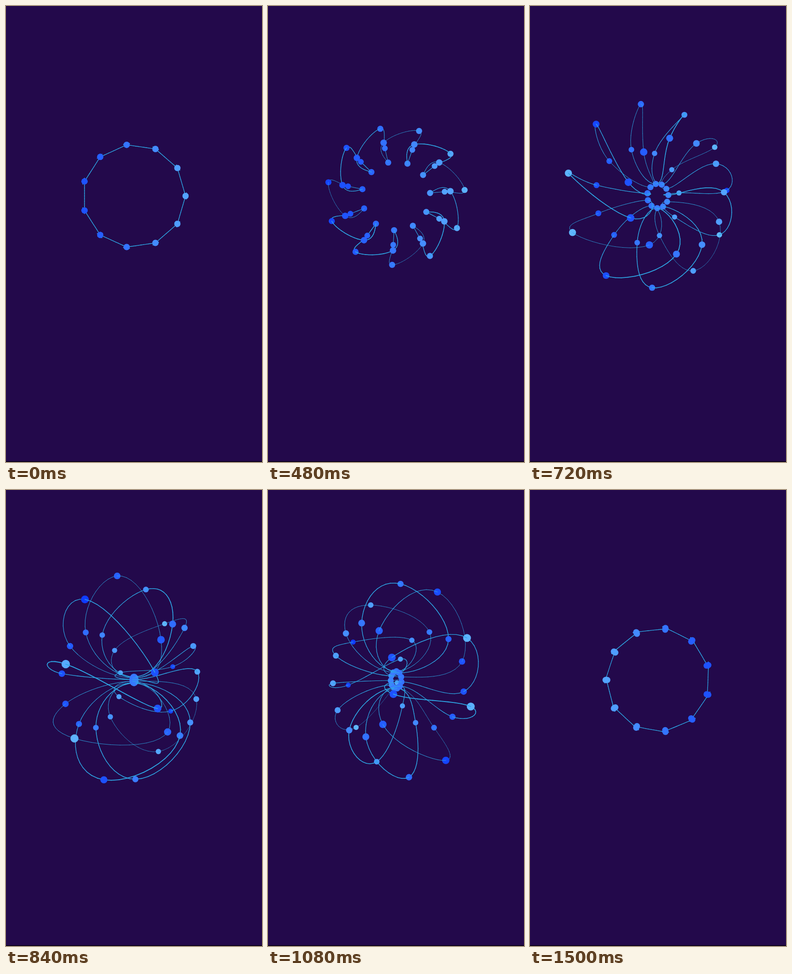
An HTML page with a canvas for the animation above (1680 ms loop, 561 by 998 pixels).

```html
<!DOCTYPE html>
<html lang="en">
<head>
<meta charset="utf-8">
<title>Torus loop</title>
<style>
  html, body { margin: 0; width: 100%; height: 100%; overflow: hidden; background: #23094b; }
  canvas { display: block; width: 561px; height: 998px; }
</style>
</head>
<body>
<canvas id="stage" width="561" height="998"></canvas>
<script>
const ctx = document.getElementById('stage').getContext('2d');
const LOOP = 1680, STEP = 30, LAST = 1500;
const CX = 280.5, CY = 415.7, RING = 113, CAMERA = 690;
const RINGS = 11, SIDES = 4, COUNT = RINGS * SIDES;
const PIECES = 12, TENSION = 0.75, DOT = 6.7;
const FLIP_START = 463, FLIP_TIME = 962;
const DARK = [14, 58, 255], LIGHT = [98, 186, 255];
const LINE = '#2ea8e6';
const WIDTHS = [1.6, 0.8, 1.2, 1.6, 0.6, 1.6, 1.6, 0.6, 1.4, 1.2, 0.7];

const lerp = (a, b, k) => a + (b - a) * k;
const clamp = v => Math.max(0, Math.min(1, v));
const wrap = (i, n) => ((i % n) + n) % n;

function hermite(a, b, ta, tb, k) {
  const k2 = k * k, k3 = k2 * k;
  return a * (2 * k3 - 3 * k2 + 1) + ta * (k3 - 2 * k2 + k) +
         b * (3 * k2 - 2 * k3) + tb * (k3 - k2);
}

// Smooth track through [time, value] keys that never overshoots
function track(keys) {
  const rate = i => (keys[i + 1][1] - keys[i][1]) / (keys[i + 1][0] - keys[i][0]);
  const slopes = keys.map((_, i) => {
    if (!i || i === keys.length - 1) return 0;
    const a = rate(i - 1), b = rate(i);
    return a * b > 0 ? 2 * a * b / (a + b) : 0;
  });
  return t => {
    let i = 0;
    while (i < keys.length - 2 && t > keys[i + 1][0]) i++;
    const [t0, v0] = keys[i], [t1, v1] = keys[i + 1], d = t1 - t0;
    return hermite(v0, v1, slopes[i] * d, slopes[i + 1] * d, clamp((t - t0) / d));
  };
}

const tubeAt = track([[0, 0], [240, 15.6], [480, 38], [540, 47.5], [720, 86.3],
                      [930, 113], [1110, 88], [1260, 31.6], [1500, 2]]);
const spinAt = track([[0, 0], [240, 10.2], [480, 37.7], [540, 45], [720, 69.4],
                      [930, 79.6], [1110, 98.2], [1260, 126.3], [1500, 130.9]]);
const flipAt = t => Math.PI * (1 - Math.cos(Math.PI * clamp((t - FLIP_START) / FLIP_TIME))) / 2;

// Tint runs along the ring's own x axis and wraps at both ends
function tint(x) {
  const v = wrap(x / 350 + 0.5, 1);
  return `rgb(${DARK.map((c, i) => Math.round(lerp(c, LIGHT[i], v))).join()})`;
}

function lineWidth(pos, tube) {
  const p = wrap(pos + 0.125, RINGS), i = Math.floor(p);
  const w = lerp(WIDTHS[i], WIDTHS[(i + 1) % RINGS], p - i);
  return lerp(1.4, w, clamp(tube / 12));
}

function draw(t) {
  const tube = tubeAt(t), spin = spinAt(t) * Math.PI / 180, flip = flipAt(t);
  const c = Math.cos(flip), s = Math.sin(flip);

  const project = ([x, y, z]) => {
    const depth = z * c - x * s, k = CAMERA / (CAMERA - depth);
    return { x: CX + (x * c + z * s) * k, y: CY + y * k, z: depth, k };
  };

  const knots = Array.from({ length: COUNT }, (_, n) => {
    const a = spin - Math.floor(n / SIDES) * 2 * Math.PI / RINGS;
    const b = (n % SIDES) * 2 * Math.PI / SIDES;
    const rho = RING + tube * Math.cos(b);
    return [rho * Math.cos(a), -rho * Math.sin(a), -tube * Math.sin(b)];
  });
  const knot = i => knots[wrap(i, COUNT)];
  const curve = (n, k) => [0, 1, 2].map(d => {
    const [p, a, b, q] = [-1, 0, 1, 2].map(o => knot(n + o)[d]);
    return hermite(a, b, TENSION * (b - p), TENSION * (q - a), k);
  });

  const items = [];
  for (let n = 0; n < COUNT; n++) {
    let from = project(knots[n]);
    items.push({ dot: true, at: from, z: from.z + 2, color: tint(knots[n][0]) });
    for (let i = 1; i <= PIECES; i++) {
      const to = project(curve(n, i / PIECES));
      const w = lineWidth((n + (i - 0.5) / PIECES) / SIDES, tube) * (from.k + to.k) / 2;
      if (Math.hypot(to.x - from.x, to.y - from.y) > 0.01)
        items.push({ from, to, w, z: (from.z + to.z) / 2 });
      from = to;
    }
  }
  items.sort((a, b) => a.z - b.z);

  ctx.fillStyle = '#23094b';
  ctx.fillRect(0, 0, 561, 998);
  ctx.fillStyle = '#06010f';
  ctx.fillRect(0, 996.5, 561, 1.5);
  ctx.strokeStyle = LINE;
  ctx.lineCap = 'round';
  for (const o of items) {
    ctx.beginPath();
    if (o.dot) {
      ctx.fillStyle = o.color;
      ctx.arc(o.at.x, o.at.y, DOT * o.at.k, 0, 2 * Math.PI);
      ctx.fill();
    } else {
      ctx.lineWidth = o.w;
      ctx.moveTo(o.from.x, o.from.y);
      ctx.lineTo(o.to.x, o.to.y);
      ctx.stroke();
    }
  }
}

const start = performance.now();
let shown = -1;
function frame() {
  const t = (performance.now() - start) % LOOP;
  const step = Math.min(LAST, Math.floor(t / STEP) * STEP);
  if (step !== shown) draw(shown = step);
  requestAnimationFrame(frame);
}
frame();
</script>
</body>
</html>
```
